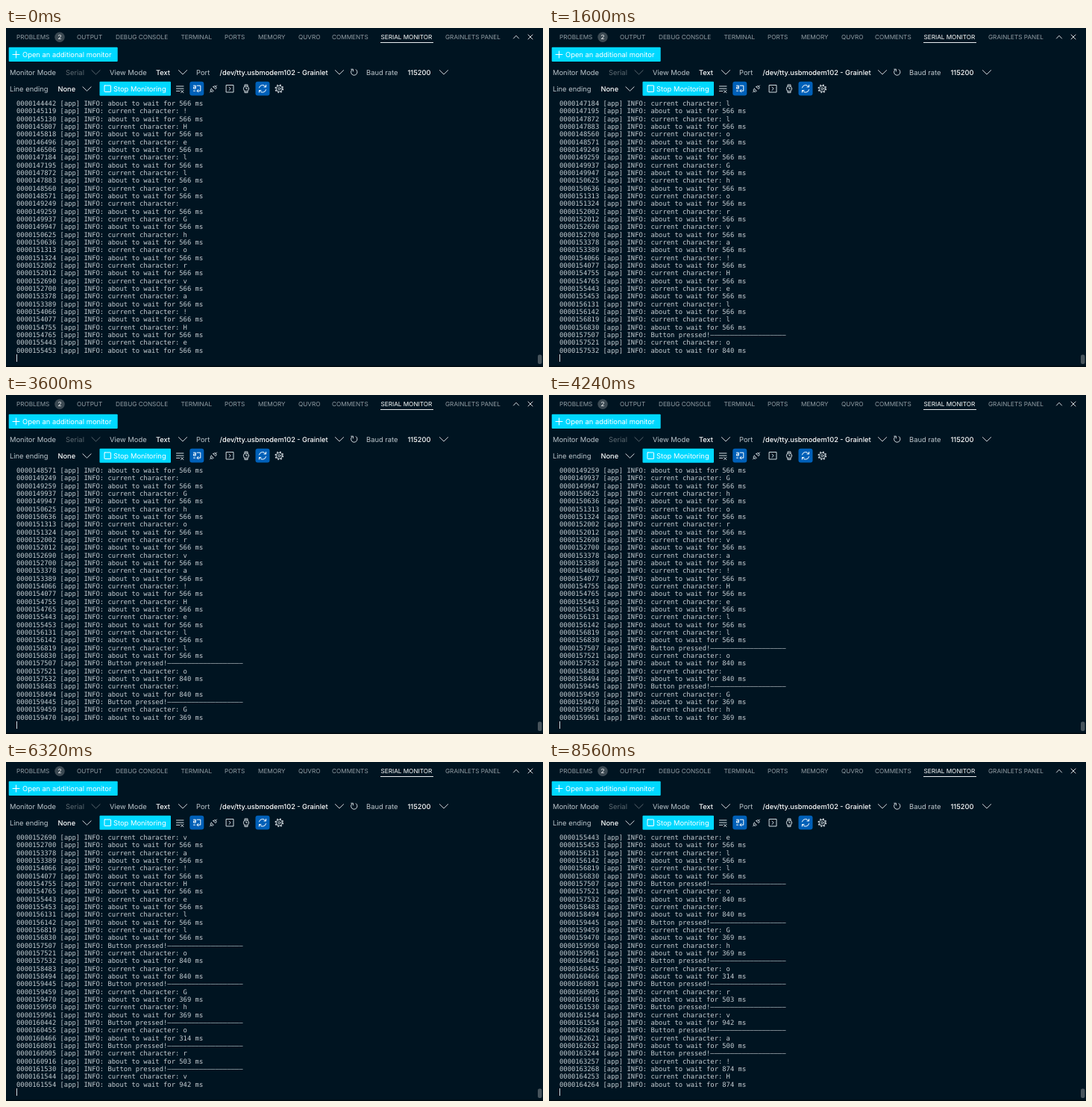
An HTML page for the animation above (8.88 s loop, 720 by 454 pixels).

```html
<!DOCTYPE html>
<html lang="en">
<head>
<meta charset="utf-8">
<title>Serial monitor</title>
<style>
html, body { margin: 0; width: 100%; height: 100%; overflow: hidden; background: #001421; }
svg { display: block; width: 720px; height: 454px; }
/* the trace of rotation keeps baselines from snapping to whole pixels */
text { font-family: Inter, "Open Sans", sans-serif; font-size: 9.4px; fill: #bcc6cc;
  text-rendering: geometricPrecision; transform: rotate(.003deg); }
.tabs text { font-size: 8.2px; fill: #929da4; }
.val { font-size: 9.25px; font-weight: 500; }
.val, text.on, .tabs .on { fill: #fff; }
.dim { fill: #5b6870; }
.log text { font: 8.86px "DejaVu Sans Mono", "Liberation Mono", monospace; fill: #c6ced3; white-space: pre; }
.line { fill: none; stroke: #d3dadf; stroke-width: 1; stroke-linecap: round; stroke-linejoin: round; }
.white { stroke: #fff; }
.faint { stroke: #5b6870; }
</style>
</head>
<body>
<svg viewBox="0 0 720 454">
  <defs><path id="arrow" d="M-5.6-2.7L0 2.8 5.6-2.7"/></defs>
  <rect width="720" height="454" fill="#001421"/>
  <rect y="452.5" width="720" height="1.5" fill="#000a11"/>

  <g class="tabs">
    <text x="14" y="15.2">PROBLEMS</text>
    <circle cx="72" cy="12.2" r="6.7" fill="#3c4a53"/>
    <text class="on" x="72" y="15.2" text-anchor="middle">2</text>
    <text x="95" y="15.2">OUTPUT</text>
    <text x="147" y="15.2">DEBUG CONSOLE</text>
    <text x="234.5" y="15.2">TERMINAL</text>
    <text x="293" y="15.2">PORTS</text>
    <text x="338" y="15.2">MEMORY</text>
    <text x="392" y="15.2">QUVRO</text>
    <text x="437" y="15.2">COMMENTS</text>
    <text class="on" x="502.5" y="15.2">SERIAL MONITOR</text>
    <text x="589" y="15.2">GRAINLETS PANEL</text>
  </g>
  <rect x="502" y="19" width="71" height="1" fill="#e8edf0"/>
  <path class="line" d="M680.5 14l3.5-3.8 3.5 3.8M700 9l6 6m0-6l-6 6"/>

  <rect x="3.7" y="25.7" width="146" height="19.4" rx="1" fill="#00d8ff"/>
  <path class="line white" d="M9 35.5h9M13.5 31v9"/>
  <text class="on" x="22" y="39">Open an additional monitor</text>

  <text x="5" y="62.7">Monitor Mode</text>
  <text class="dim" x="80" y="62.7">Serial</text>
  <text x="139" y="62.7">View Mode</text>
  <text class="val" x="201" y="62.7">Text</text>
  <text x="255" y="62.7">Port</text>
  <text class="val" x="286.5" y="62.7">/dev/tty.usbmodem102 - Grainlet</text>
  <text x="483" y="62.7">Baud rate</text>
  <text class="val" x="538.5" y="62.7">115200</text>
  <text x="5" y="85">Line ending</text>
  <text class="val" x="69.5" y="85">None</text>

  <use class="line faint" href="#arrow" x="120.5" y="59.3"/>
  <g class="line">
    <use href="#arrow" x="237" y="59.3"/>
    <use href="#arrow" x="447" y="59.3"/>
    <use href="#arrow" x="587" y="59.3"/>
    <use href="#arrow" x="108.5" y="81.5"/>
  </g>
  <path class="line" d="M463.6 56.2a4.2 4.2 0 1 0 5.6-.6M462.8 55.2h2.6v2.7"/>

  <rect x="125.5" y="71.7" width="95.5" height="19" rx="1" fill="#00d8ff"/>
  <rect class="line white" x="132" y="77" width="8.5" height="8.5" rx=".5"/>
  <text class="on" x="144" y="85">Stop Monitoring</text>

  <path class="line" d="M228.5 78h9.5M228.5 81.2h9.5M228.5 84.4h4.5M234.6 83.4l3.4 3.4m0-3.4l-3.4 3.4"/>
  <g fill="#0060b8">
    <rect x="246.3" y="71.8" width="19" height="18.8" rx="3"/>
    <rect x="334.5" y="71.8" width="19" height="18.8" rx="3"/>
  </g>
  <path class="line white" d="M251.5 77.2h2.8v4h-2.8v-2h2.8M256.2 77.2h4.6v7h-4.6M257.8 82.4l-1.8 1.8 1.8 1.8M251.5 84.2h2"/>
  <path class="line" d="M273.5 86l2.2-2.2M275.2 81.3l3 3a2.2 2.2 0 1 1-3-3zM282.5 77l-2 2M277.9 78.8l3 3a2.2 2.2 0 1 0-3-3z"/>
  <path class="line" d="M295.5 76.5h9.5v9.5h-9.5zM299 79.2l2.2 2.1-2.2 2.1"/>
  <circle class="line" cx="322" cy="81.3" r="3.6"/>
  <path class="line" d="M320 78v-2h4v2M320 84.6v2h4v-2M322 79.6v1.8h1.3"/>
  <path class="line white" d="M339.4 80a4.8 4.8 0 0 1 8.8-1.2M348.6 76.4v2.6h-2.6M348.6 82.6a4.8 4.8 0 0 1-8.8 1.2M339.4 86.2v-2.6h2.6"/>
  <g class="line">
    <circle cx="366.3" cy="81.3" r="1.5"/>
    <circle cx="366.3" cy="81.3" r="3.9"/>
    <circle cx="366.3" cy="81.3" r="5.1" stroke-width="1.5" stroke-dasharray="2 2.005" stroke-linecap="butt"/>
  </g>

  <g id="log" class="log"></g>
  <rect id="cursor" y="437" width="1" height="10" fill="#d5dce0"/>
  <rect x="713" y="437.5" width="5.5" height="12.5" rx="2.2" fill="#47545c"/>
</svg>
<script>
const LOOP = 8880, STEP = 80;
const ROWS = 34, TOP = 104.1, ROW_H = 10.33, LEFT = 14, CHAR_W = 5.334;
const log = document.getElementById("log");
const cursor = document.getElementById("cursor");

// Device clock in ms: stamp at page start, then what each action costs
const CLOCK = 156000, FIRST = 144431.41, COUNT = 29;
const PRESS_COST = 13.55, PRINT_COST = 10.65, CYCLE_COST = 122.24;
const message = "Hello Ghorva!";
// a button press before the given character picks a new wait
const presses = { 19: 840, 21: 369, 23: 314, 24: 503, 25: 942, 26: 500, 27: 874 };
const lines = [];

function record(stamp, body) {
  const digits = String(Math.floor(stamp)).padStart(10, "0");
  lines.push({ text: `${digits} [app] INFO: ${body}`, at: stamp - CLOCK });
}

let clock = FIRST, wait = 566;
for (let i = 0; i < COUNT; i++) {
  if (presses[i]) {
    record(clock, "Button pressed!" + "–".repeat(19));
    wait = presses[i];
    clock += PRESS_COST;
  }
  record(clock, "current character: " + message[(i + 11) % message.length]);
  record(clock + PRINT_COST, `about to wait for ${wait} ms`);
  clock += wait + CYCLE_COST;
}

const rows = Array.from({ length: ROWS }, (_, i) => {
  const row = document.createElementNS("http://www.w3.org/2000/svg", "text");
  row.setAttribute("x", LEFT);
  row.setAttribute("y", TOP + i * ROW_H);
  return log.appendChild(row);
});

function draw(time) {
  const t = Math.floor(time / STEP) * STEP;
  const shown = lines.filter(line => line.at <= t);
  const last = shown[shown.length - 1];
  const typed = Math.floor((t - last.at) * 0.95);
  let tail = "";
  if (typed <= last.text.length) {
    tail = last.text.slice(0, typed);
    shown.pop();
  }
  const view = shown.slice(1 - ROWS).map(line => line.text).concat(tail);
  rows.forEach((row, i) => {
    if (row.textContent !== view[i]) row.textContent = view[i];
  });
  cursor.setAttribute("x", LEFT + Math.round(tail.length * CHAR_W));
}

const start = performance.now();
function frame() {
  draw((performance.now() - start) % LOOP);
  requestAnimationFrame(frame);
}
draw(0);
requestAnimationFrame(frame);
</script>
</body>
</html>
```
